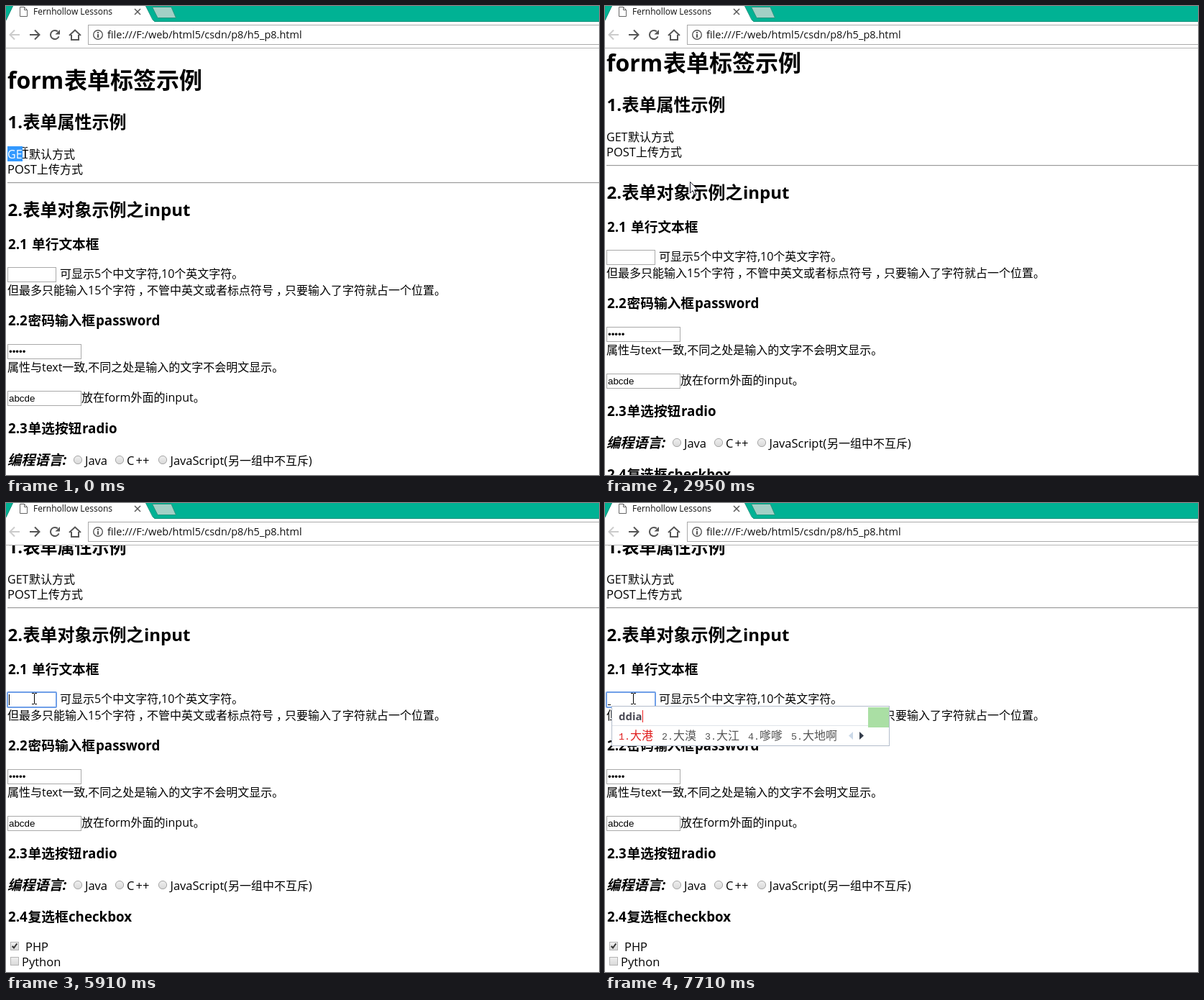
Animation of 825x652 px, one loop 8 s. Source, as an HTML page with a canvas:

```html
<!DOCTYPE html>
<html lang="zh-CN">
<head>
<meta charset="utf-8">
<title>Form demo</title>
<style>
html, body { margin: 0; width: 100%; height: 100%; overflow: hidden; background: #fff; }
canvas { display: block; }
</style>
</head>
<body>
<canvas id="stage" width="825" height="652"></canvas>
<script>
const ctx = document.getElementById('stage').getContext('2d');
const LOOP = 8000;
const SANS = '"Open Sans", "Noto Sans CJK SC", sans-serif';
const ARIAL = '"Liberation Sans", sans-serif';
const MONO = '"Liberation Mono", monospace';

// time, x, y, shape, right edge of the selection
const pointer = [
  [0, 26, 204, 'beam', 23], [400, 30, 204, 'beam', 32], [520, 37, 204, 'beam', 32],
  [670, 46, 204, 'beam', 48], [790, 58, 204, 'beam', 64], [910, 68, 205, 'beam', 64],
  [1030, 76, 205, 'beam', 80], [1180, 77, 205, 'beam', 80], [1430, 81, 205, 'beam', 80],
  [1580, 88, 205, 'beam', 96], [1705, 95, 205, 'beam', 96], [1830, 101, 204, 'arrow', 96],
  [1970, 110, 225, 'arrow', 96], [2090, 118, 244, 'arrow', 96], [2240, 118, 244, 'arrow', 0],
  [3260, 90, 251, 'arrow', 0], [3410, 80, 256, 'arrow', 0], [3530, 72, 262, 'arrow', 0],
  [3650, 52, 267, 'beam', 0], [3800, 39, 272, 'beam', 0]
];
const scroll = [[0, 0], [2950, 24], [3110, 100]];
const caret = [[0, 0], [3800, 4], [4460, 0], [4890, 4], [5480, 0], [5910, 4],
  [6500, 8], [7060, 0], [7180, 8], [7710, 0]];
const typing = [
  [0, ''],
  [6500, 'd', '#222', '在 大 的(rqyy) 到(gcfj) の'],
  [6630, 'dd', '#e22', '大 大大 大夫 达到 得到'],
  [7060, 'ddi', '#222', '大海 大江 大河 大学 大汉'],
  [7180, 'ddia', '#e22', '大港 大漠 大江 嗲嗲 大地啊']
];
const at = (list, t) => list.findLast(step => step[0] <= t);

function text(s, x, y, font = '16px ' + SANS, color = '#000') {
  ctx.font = font;
  ctx.fillStyle = color;
  ctx.fillText(s, x, y);
  return x + ctx.measureText(s).width;
}

// runs: text, x, text, x, ...
function line(y, style, ...runs) {
  for (let i = 0; i < runs.length; i += 2) text(runs[i], runs[i + 1], y, style + ' ' + SANS);
}

function rect(x, y, w, h, color) {
  ctx.fillStyle = color;
  ctx.fillRect(x, y, w, h);
}

function frame(x, y, w, h, color, fill = '#fff') {
  rect(x, y, w, h, color);
  rect(x + 1, y + 1, w - 2, h - 2, fill);
}

function path(points, { fill, stroke, width = 1, close = false }) {
  ctx.beginPath();
  for (let i = 0; i < points.length; i += 2) ctx.lineTo(points[i], points[i + 1]);
  if (close) ctx.closePath();
  if (fill) { ctx.fillStyle = fill; ctx.fill(); }
  if (stroke) { ctx.strokeStyle = stroke; ctx.lineWidth = width; ctx.stroke(); }
}

function arc(x, y, r, stroke, width, from = 0, to = 7) {
  ctx.beginPath();
  ctx.arc(x, y, r, from, to);
  ctx.strokeStyle = stroke;
  ctx.lineWidth = width;
  ctx.stroke();
}

function shade(y) {
  const g = ctx.createLinearGradient(0, y - 6, 0, y + 6);
  g.addColorStop(0, '#f0f0f0');
  g.addColorStop(1, '#d8d8d8');
  return g;
}

function radio(x, y) {
  ctx.fillStyle = shade(y);
  ctx.beginPath();
  ctx.arc(x, y, 6, 0, 7);
  ctx.fill();
  arc(x, y, 5.6, '#a8a8a8', 1);
}

function checkbox(y, on) {
  frame(6, y - 6, 12, 12, '#b4b4b4', shade(y));
  if (on) path([8.7, y, 11, y + 2.5, 15.3, y - 3.5], { stroke: '#333', width: 2 });
}

function browser() {
  rect(0, 0, 825, 59, '#fff');
  rect(0, 0, 825, 21, '#00b294');
  rect(0, 21, 825, 1, '#0a8f78');
  path([0, 22, 0, 20, 10, -1, 194, -1, 205, 20, 207, 22], { fill: '#fff' });
  path([0, 20, 10, -1], { stroke: '#0a8f78' });
  path([194, -1, 204, 19, 207, 21.5], { stroke: '#0a8f78' });
  path([203.5, 1.5, 230, 1.5, 236.5, 16.5, 211, 16.5],
    { fill: '#a3d0c6', stroke: '#29957f', close: true });

  path([19.5, 1.5, 25.5, 1.5, 29.5, 5.5, 29.5, 14.5, 19.5, 14.5],
    { fill: '#fff', stroke: '#666', close: true });
  path([25.5, 1.5, 25.5, 5.5, 29.5, 5.5], { stroke: '#666' });
  text('Fernhollow Lessons', 38, 12, '12px ' + SANS, '#111');
  path([179, 4, 187, 12], { stroke: '#555', width: 1.5 });
  path([187, 4, 179, 12], { stroke: '#555', width: 1.5 });

  for (const [x, dir, color] of [[12, -1, '#ccc'], [40, 1, '#555']]) {
    path([x - 7 * dir, 40, x + 6 * dir, 40], { stroke: color, width: 2 });
    path([x, 33.5, x + 6.5 * dir, 40, x, 46.5], { stroke: color, width: 2 });
  }
  arc(68, 40, 6, '#555', 2, 0.4, 5.4);
  path([75, 33, 75, 39.5, 68.5, 39.5], { fill: '#555' });
  path([88, 41, 96, 33.5, 104, 41], { stroke: '#555', width: 2 });
  path([91, 40, 91, 47, 101, 47, 101, 40], { stroke: '#555', width: 2 });

  frame(114, 26, 720, 28, '#aaa');
  arc(128, 40, 6.3, '#555', 1.4);
  rect(127, 39, 2, 5, '#555');
  rect(127, 36, 2, 2, '#555');
  text('file:///F:/web/html5/csdn/p8/h5_p8.html', 141, 45, '14.5px ' + SANS, '#111');
  rect(0, 58, 825, 1, '#b6b6b6');
}

function page(t, top, selected) {
  ctx.save();
  ctx.beginPath();
  ctx.rect(0, 59, 825, 593);
  ctx.clip();
  ctx.translate(0, -top);

  const h2 = 'bold 24px', h3 = 'bold 18.72px', p = '16px', latin = '16.5px';
  line(115, 'bold 32px', 'form', 2, '表单标签示例', 81);
  line(170, h2, '1.', 2.5, '表单属性示例', 23.5);
  const first = color => {
    text('GET', 2, 212, undefined, color);
    text('默认方式', 32, 212, undefined, color);
  };
  first('#000');
  if (selected) {
    ctx.save();
    ctx.beginPath();
    ctx.rect(2, 195, selected - 2, 21);
    ctx.clip();
    rect(2, 195, 100, 21, '#3399ff');
    first('#fff');
    ctx.restore();
  }
  line(233, latin, 'POST', 2);
  line(233, p, '上传方式', 43);
  rect(2, 245, 823, 1, '#9a9a9a');
  rect(2, 246, 823, 1, '#eee');

  line(292, h2, '2.', 2.5, '表单对象示例之', 23.5, 'input', 192);
  line(338, h3, '2.1', 3, '单行文本框', 36);
  frame(2, 363, 68, 21, '#a9a9a9');
  if (t >= 3800) {
    ctx.strokeStyle = '#6f9fe8';
    ctx.lineWidth = 2;
    ctx.beginPath();
    ctx.roundRect(2, 363, 68, 21, 1);
    ctx.stroke();
  }
  line(378, p, '可显示5个中文字符,10个英文字符。', 75);
  line(401, p, '但最多只能输入15个字符', 2, '，', 184, '不管中英文或者标点符号', 196,
    '，', 376, '只要输入了字符就占一个位置。', 388);

  line(444, h3, '2.2', 3, '密码输入框', 30.5, 'password', 125);
  frame(2, 470, 103, 21, '#a9a9a9');
  text('•••••', 4, 485, '13.333px ' + ARIAL);
  line(508, p, '属性与text一致,不同之处是输入的文字不会明文显示。', 2);
  frame(2, 535, 103, 21, '#a9a9a9');
  text('abcde', 4, 550, '13.333px ' + ARIAL);
  line(550, p, '放在form外面的input。', 105);

  line(594, h3, '2.3', 3, '单选按钮', 30.5, 'radio', 106);
  line(638, 'italic bold 19.2px', '编程语言:', 2);
  for (const x of [100, 158, 218]) radio(x, 631);
  line(638, latin, 'Java', 110, 'C', 168, '++', 180.5, 'JavaScript(', 228.5);
  line(638, p, '另一组中不互斥)', 309);

  line(682, h3, '2.4', 3, '复选框', 30.5, 'checkbox', 87);
  checkbox(716, true);
  checkbox(737, false);
  line(723, latin, 'PHP', 27);
  line(744, latin, 'Python', 22);
  ctx.restore();
}

function cursor(x, y, shape) {
  if (shape === 'beam') {
    rect(x, y - 7, 1, 14, '#000');
    for (const edge of [y - 8, y + 7]) {
      rect(x - 3, edge, 3, 1, '#000');
      rect(x + 1, edge, 3, 1, '#000');
    }
  } else {
    path([0.5, 0.5, 0.5, 16, 4, 12.7, 6.7, 18.5, 9, 17.5, 6.5, 11.8, 11.3, 11.5]
      .map((v, i) => v + (i % 2 ? y : x)), { fill: '#fff', stroke: '#1a1a2a', close: true });
  }
}

function candidates(words) {
  let x = 19;
  words.split(' ').forEach((word, i) => {
    const color = i ? '#555' : '#e02020';
    for (const part of `${i + 1}.${word}`.match(/[\x20-\x7e]+|[^\x20-\x7e]+/g)) {
      const font = part < '\x7f' ? '13.333px ' + MONO : '300 16px "Noto Sans CJK SC", sans-serif';
      x = text(part, x, 329, font, color);
    }
    x += 12;
  });
}

function inputMethod([, typed, color, words]) {
  if (!typed) return;
  rect(4, 280, 4, 1, '#000');
  frame(9, 282, 387, 56, '#b3bccb');
  rect(10, 309, 385, 1, '#e0e4ea');
  const end = text(typed, 19, 302, 'bold 15px ' + SANS, '#4a4a55');
  rect(Math.round(end), 288, 1, 17, color);
  candidates(words);
  path([345, 318, 345, 329, 339, 323.5], { fill: '#cbd9e8' });
  path([354, 318, 354, 329, 360, 323.5], { fill: '#333c4a' });
  rect(366, 284, 29, 28, '#aadfa4');
}

function draw(now) {
  const t = now % LOOP;
  const [, x, y, shape, selected] = at(pointer, t);
  rect(0, 0, 825, 652, '#fff');
  page(t, at(scroll, t)[1], selected);
  browser();
  const caretX = at(caret, t)[1];
  if (caretX) rect(caretX, 266, 1, 15, '#000');
  cursor(x, y, shape);
  inputMethod(at(typing, t));
}

const start = performance.now();
function tick() {
  draw(performance.now() - start);
  requestAnimationFrame(tick);
}
tick();
</script>
</body>
</html>
```
